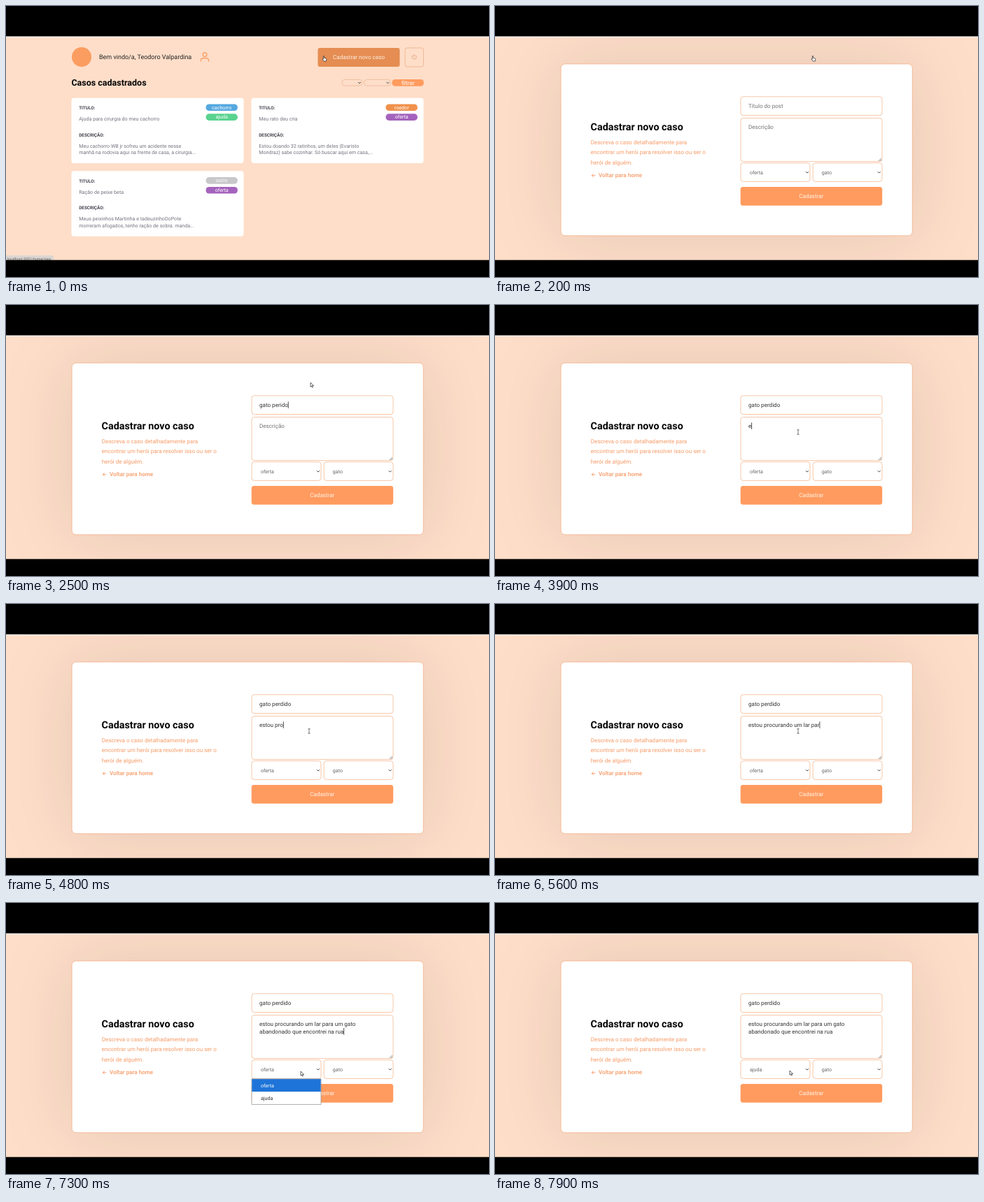
Recreate the animation shown at these times as an HTML page. Size 690x388 px, loop 8 s.

```html
<!DOCTYPE html>
<html lang="pt-BR">
<head>
<meta charset="utf-8">
<title>Cadastrar novo caso</title>
<style>
  html, body { margin: 0; width: 100%; height: 100%; overflow: hidden; background: #000; }
  svg { display: block; width: 690px; height: 388px; font-family: Roboto, Arial, sans-serif; text-rendering: geometricPrecision; }
  .h { font-weight: 700; fill: #050505; }
  .m { font-size: 8.08px; }
  .s { font-size: 7.12px; fill: #666; }
  .label { font-size: 6.35px; font-weight: 700; fill: #41414d; }
  .card { font-size: 7.15px; fill: #737380; }
  .tag { font-size: 7.15px; fill: #fff; text-anchor: middle; }
  .accent { fill: #f69a66; }
  .typed { fill: #333; }
  .hint { fill: #757575; }
  .field { fill: #fff; stroke: #f7c19c; stroke-width: .9; }
  .line { fill: none; stroke-linecap: round; stroke-linejoin: round; }
  .panel { fill: #fff; stroke: #f3b894; filter: drop-shadow(0 0 50px rgba(0, 0, 0, .1)); }
</style>
</head>
<body>
<svg viewBox="0 0 690 388">
  <defs>
    <path id="chevron" class="line" d="M-1.7-.8 0 .9 1.7-.8" stroke="#333" stroke-width=".9"/>
  </defs>
  <rect y="43" width="690" height="321" fill="#fedec9"/>

  <g id="home">
    <circle cx="108" cy="73" r="14" fill="#fb9d60"/>
    <text x="133" y="76.4" font-size="8.97" fill="#222">Bem vindo/a, Teodoro Valpardina</text>
    <g class="line" stroke="#f9a068" stroke-width="1.4">
      <circle cx="284" cy="69.6" r="2.9"/>
      <path d="M278.4 79v-1.2a3 3 0 0 1 3-3h5.2a3 3 0 0 1 3 3V79"/>
    </g>
    <rect x="445.5" y="60" width="117" height="27" rx="3" fill="#e58d52"/>
    <text class="m" x="504" y="76" text-anchor="middle" fill="#fff0e4">Cadastrar novo caso</text>
    <rect x="570" y="60" width="26.5" height="27" rx="3" fill="none" stroke="#ecb592" stroke-width=".9"/>
    <path class="line" d="M583.2 69.6v3.2M581.2 70.6a3.1 3.1 0 1 0 4 0" stroke="#e5a47e" stroke-width=".9"/>
    <text class="h" x="93.4" y="114" font-size="12.5">Casos cadastrados</text>
    <g fill="none" stroke="#eeb894" stroke-width=".8">
      <rect x="480" y="105.4" width="29" height="8.8" rx="4"/>
      <rect x="511.6" y="105.4" width="38" height="8.8" rx="4"/>
    </g>
    <use href="#chevron" x="505" y="110"/>
    <use href="#chevron" x="545.5" y="110"/>
    <rect x="551.5" y="105" width="45.3" height="9.8" rx="4.5" fill="#ff9b5e"/>
    <text class="m" x="574.3" y="112.7" text-anchor="middle" fill="#fff">filtrar</text>
    <g id="cards"></g>
    <path d="M0 357h66a2 2 0 0 1 2 2v5H0z" fill="#dcd6d2"/>
    <text x="1.5" y="363.7" font-size="5.35" fill="#666">localhost:3001/home/new</text>
  </g>

  <g id="form">
    <rect class="panel" x="94" y="82.9" width="502.3" height="246" rx="6"/>
    <text class="h" x="136.6" y="177.7" font-size="14.35">Cadastrar novo caso</text>
    <g class="m accent">
      <text x="136.8" y="198">Descreva o caso detalhadamente para</text>
      <text x="136.8" y="212.3">encontrar um herói para resolver isso ou ser o</text>
      <text x="136.8" y="226.6">herói de alguém.</text>
      <text x="148" y="245.4" font-weight="500">Voltar para home</text>
    </g>
    <path class="line" d="M143 242.7h-4.6m2-2-2 2 2 2" stroke="#f69a66" stroke-width=".9"/>

    <rect class="field" x="351" y="129.8" width="202" height="26.8" rx="3.5"/>
    <rect class="field" x="351" y="160.6" width="202" height="62" rx="3.5"/>
    <path class="line" d="M548.3 221.7l3.4-3.4M550.3 221.9l1.6-1.6" stroke="#666" stroke-width=".7"/>
    <rect class="field" x="351" y="224.7" width="99" height="26.7" rx="3.5"/>
    <rect class="field" x="454.2" y="224.7" width="98.8" height="26.7" rx="3.5"/>
    <use href="#chevron" x="446" y="238.2"/>
    <use href="#chevron" x="548.7" y="238.2"/>
    <text id="kind" class="s" x="363.9" y="240.6"></text>
    <text class="s" x="466.8" y="240.6">gato</text>
    <rect id="send" x="350.7" y="259" width="202.5" height="26.8" rx="3.5"/>
    <text class="m" x="451.8" y="275.1" text-anchor="middle" fill="#fff4ea">Cadastrar</text>

    <text id="title" class="m" x="362" y="146"></text>
    <text id="body1" class="m" x="362" y="175.8"></text>
    <text id="body2" class="m typed" x="362" y="186.6"></text>
    <rect id="caret" width=".8" height="9.6" fill="#222"/>

    <g id="menu">
      <rect x="351" y="251.8" width="99" height="36.5" fill="#fff" stroke="#8a8a8a" stroke-width=".7"/>
      <rect id="pick" x="351.3" width="98.4" height="18" fill="#1e74d8"/>
      <text id="opt0" class="s" x="363.9" y="263.5">oferta</text>
      <text id="opt1" class="s" x="363.9" y="281.5">ajuda</text>
    </g>
  </g>

  <rect y="43.4" width="690" height="1.8" fill="#f3ebe6"/>
  <rect width="690" height="43.4"/>
  <rect y="363.7" width="690" height="24.3"/>

  <g id="pointer">
    <path id="arrow" d="M0 0v6.2l1.5-1.3 1 2.2 1-.5-1-2.1h2z" fill="#fff" stroke="#222" stroke-width=".7"/>
    <path id="beam" class="line" d="M-1.2-3.2h2.4M0-3.2v6.4M-1.2 3.2h2.4" stroke="#444" stroke-width=".7"/>
    <path id="hand" d="M0 .5q.7-1 1.3 0v2.7l2.5.6q.8.3.7 1.3l-.5 2.7H.9L-1.4 4.9q.2-1 1.4 0z" fill="#fff" stroke="#222" stroke-width=".7"/>
  </g>
</svg>
<script>
const LOOP = 8000;
const $ = id => document.getElementById(id);
const show = (id, on) => { $(id).style.display = on ? '' : 'none'; };

const BLUE = '#55a8df', GREEN = '#59d38f', ORANGE = '#f0914b', PURPLE = '#a463bd', GREY = '#c8c8ca';
const cards = [
  [93.5, 131.7, 'Ajuda para cirurgia do meu cachorro',
    ['Meu cachorro WB jr sofreu um acidente nesse', 'manhã na rodovia aqui na frente de casa, a cirurgia...'],
    ['cachorro', BLUE], ['ajuda', GREEN]],
  [350.5, 131.7, 'Meu rato deu cria',
    ['Estou doando 32 ratinhos, um deles (Evaristo', 'Mondraz) sabe cozinhar. Só buscar aqui em casa,...'],
    ['roedor', ORANGE], ['oferta', PURPLE]],
  [93.5, 236.3, 'Ração de peixe beta',
    ['Meus peixinhos Martinha e tadeuzinhoDoPote', 'morreram afogados, tenho ração de sobra. manda...'],
    ['outro', GREY], ['oferta', PURPLE]],
];
const tag = ([name, color], y) =>
  `<rect x="192" y="${y}" width="45.4" height="9.6" rx="4.6" fill="${color}"/>
   <text class="tag" x="214.7" y="${y + 7.2}">${name}</text>`;
$('cards').innerHTML = cards.map(([x, y, title, lines, top, low]) =>
  `<g transform="translate(${x} ${y})">
    <rect width="246" height="93.4" rx="3.5" fill="#fff"/>
    <text class="label" x="10.7" y="16.7">TITULO:</text>
    <text class="card" x="10.7" y="32.6">${title}</text>
    <text class="label" x="10.7" y="55">DESCRIÇÃO:</text>
    <text class="card" x="10.7" y="71">${lines[0]}</text>
    <text class="card" x="10.7" y="80.7">${lines[1]}</text>
    ${tag(top, 8.8)}${tag(low, 22.6)}
  </g>`).join('');

// Each row starts with the time at which it takes effect.
const pointer = [
  [0, 'hand', 453.3, 71.2], [300, 'arrow', 452, 77], [400, 'arrow', 445, 88], [500, 'arrow', 434, 104],
  [600, 'arrow', 425, 118], [700, 'arrow', 422, 123],
  [1000, 'beam', 428, 139], [1100, 'arrow', 435, 111],
  [3200, 'arrow', 435, 122], [3300, 'beam', 434, 152], [3400, 'beam', 433, 190], [3500, 'beam', 433, 182],
  [7100, 'beam', 431, 205], [7200, 'arrow', 424, 266], [7300, 'arrow', 421, 241],
  [7500, 'arrow', 421, 259], [7600, 'arrow', 421, 270], [7800, 'arrow', 421, 254], [7900, 'arrow', 421, 240],
];
const titles = [
  [0, ''], [1300, 'g'], [1400, 'ga'], [1500, 'gat'], [2000, 'gato'], [2100, 'gato '],
  [2300, 'gato pe'], [2400, 'gato peri'], [2500, 'gato perido'], [2600, 'gato peri'], [2700, 'gato per'],
  [2800, 'gato perd'], [2900, 'gato perdi'], [3000, 'gato perdido'],
];
const carets = [
  [0, ''], [1000, 'title'], [1800, ''], [2000, 'title'], [3400, ''],
  [3500, 'body'], [3700, ''], [3900, 'body'], [7500, ''],
];
// Typed letters, linear between points.
const typing = [[3800, 0], [3900, 1], [4000, 2], [4200, 2], [4300, 3], [4500, 3], [5600, 27], [6600, 53], [7100, 68]];
const line1 = 'estou procurando um lar para um gato ';
const line2 = 'abandonado que encontrei na rua';

const at = (rows, t) => rows.filter(row => row[0] <= t).pop();

function lettersAt(t) {
  const next = typing.findIndex(p => p[0] > t);
  if (next === 0) return 0;
  if (next < 0) return typing[typing.length - 1][1];
  const [t0, n0] = typing[next - 1], [t1, n1] = typing[next];
  return Math.floor(n0 + (n1 - n0) * (t - t0) / (t1 - t0) + 1e-6);
}

function setInput(id, text, hint) {
  $(id).textContent = text || hint;
  $(id).setAttribute('class', text ? 'm typed' : 'm hint');
}

function placeCaret(id, text, y) {
  const width = text ? $(id).getSubStringLength(0, text.length) : 0;
  $('caret').setAttribute('x', 362 + width);
  $('caret').setAttribute('y', y);
}

function draw(t) {
  const onHome = t < 200;
  show('home', onHome);
  show('form', !onHome);

  const [, shape, x, y] = at(pointer, t);
  for (const name of ['arrow', 'beam', 'hand']) show(name, name === shape);
  $('pointer').setAttribute('transform', `translate(${x} ${y})`);
  if (onHome) return;

  const title = at(titles, t)[1];
  const count = lettersAt(t);
  const first = line1.slice(0, count);
  const second = line2.slice(0, Math.max(0, count - line1.length));
  setInput('title', title, 'Título do post');
  setInput('body1', first, 'Descrição');
  $('body2').textContent = second;

  const focus = at(carets, t)[1];
  show('caret', focus);
  if (focus === 'title') placeCaret('title', title, 138.3);
  else if (second) placeCaret('body2', second, 179);
  else placeCaret('body1', first, 168.3);

  $('send').setAttribute('fill', t >= 7200 && t < 7300 ? '#e68c55' : '#ff9b5f');
  $('kind').textContent = t < 7700 ? 'oferta' : 'ajuda';
  show('menu', t >= 7300 && t < 7700);
  const picked = t < 7500 ? 0 : 1;
  $('pick').setAttribute('y', 252.1 + 18 * picked);
  [0, 1].forEach(i => { $('opt' + i).style.fill = i === picked ? '#fff' : '#333'; });
}

function tick() {
  draw(Math.floor(performance.now() % LOOP / 100) * 100);
  requestAnimationFrame(tick);
}
tick();
</script>
</body>
</html>
```
